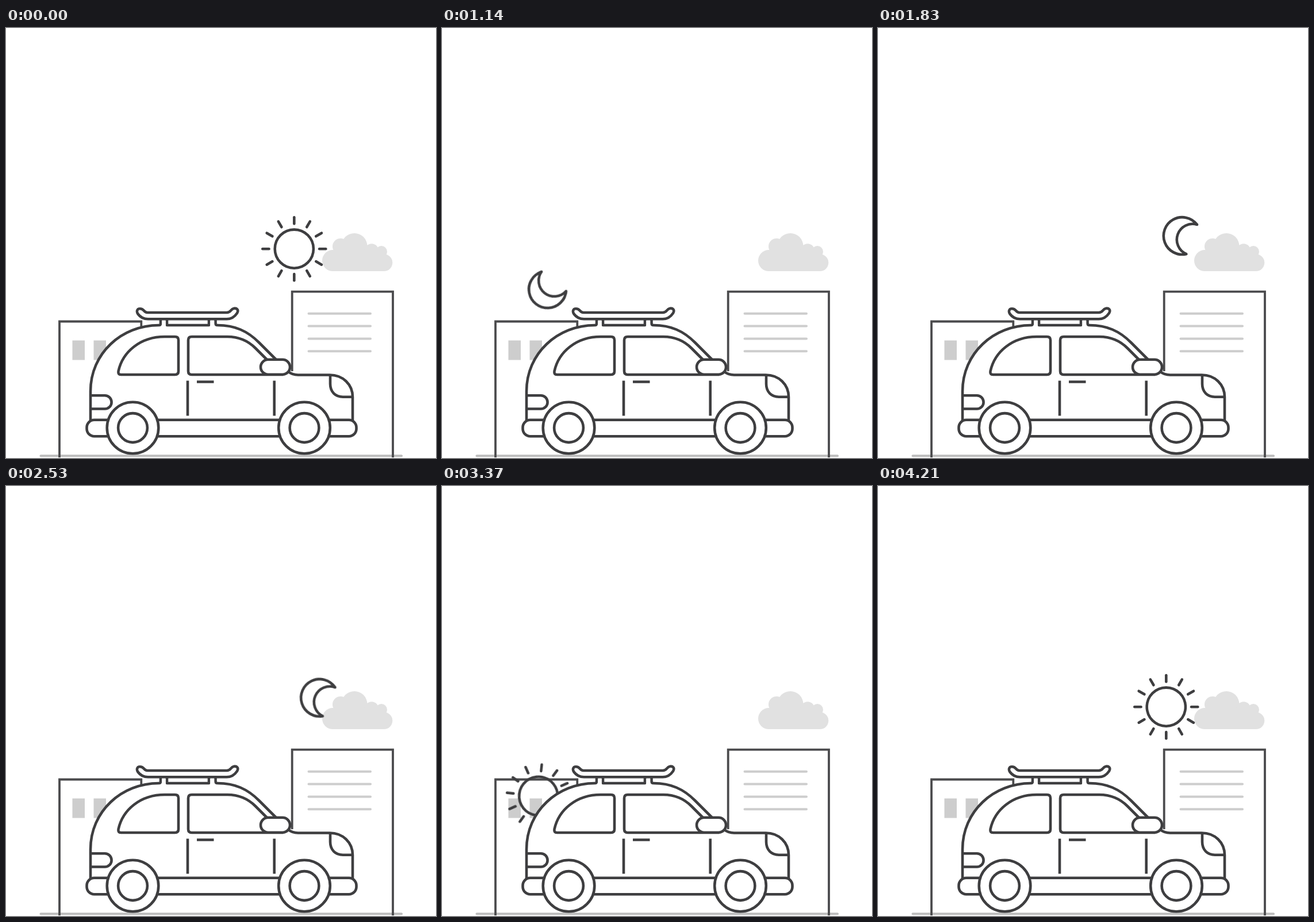
An HTML page that plays this animation: 748x748 px, repeating every 4.64 s.

```html
<!DOCTYPE html>
<html lang="en">
<head>
<meta charset="utf-8">
<title>Day and night drive</title>
<style>
  html, body { margin: 0; width: 100%; height: 100%; overflow: hidden; background: #fff; }
  svg { display: block; width: 100%; height: 100%; }

  .line { fill: none; stroke: #3e3e40; stroke-width: 4.6; stroke-linejoin: round; }
  .solid { fill: #fff; }
  .round { stroke-linecap: round; }
  .building { fill: none; stroke: #4b4b4d; stroke-width: 3.8; }
  .ground { stroke: #bcbcbc; stroke-width: 4; stroke-linecap: round; }
  .detail { fill: none; stroke: #cdcdcd; stroke-width: 4; stroke-linecap: round; }
  .pane { fill: #cdcdcd; }
  .cloud { fill: #e1e1e1; }

  /* Sun and moon circle the same point and move every 30 ms. */
  .sky { transform-origin: 420.7px 647px; animation: 4640ms -2ms infinite; }
  #sun { animation-name: sun-turn, sun-show; animation-timing-function: linear, step-end; }
  #moon { animation-name: moon-turn, moon-show; animation-timing-function: linear, step-end; }

  @keyframes sun-turn {
    0% { transform: rotate(0deg); }
    5.1724% { transform: rotate(0deg); animation-timing-function: steps(10); }
    11.6379% { transform: rotate(37.7deg); animation-timing-function: steps(14); }
    20.6897% { transform: rotate(81.4deg); animation-timing-function: step-end; }
    65.5172% { transform: rotate(-117deg); animation-timing-function: steps(39); }
    90.7328%, 100% { transform: rotate(0deg); }
  }
  @keyframes sun-show {
    0% { opacity: 1; }
    20.6897% { opacity: 0; }
    66.1638%, 100% { opacity: 1; }
  }
  @keyframes moon-turn {
    0% { transform: rotate(-109.2deg); }
    16.8103% { transform: rotate(-109.2deg); animation-timing-function: steps(35); }
    39.4397% { transform: rotate(0deg); }
    53.8793% { transform: rotate(0deg); animation-timing-function: steps(11); }
    60.9914% { transform: rotate(36.6deg); animation-timing-function: steps(9); }
    66.8103%, 100% { transform: rotate(64.1deg); }
  }
  @keyframes moon-show {
    0% { opacity: 0; }
    17.4569% { opacity: 1; }
    66.8103%, 100% { opacity: 0; }
  }
</style>
</head>
<body>
<svg viewBox="0 0 748 748">
  <defs>
    <path id="ray" d="M0-43.8V-55"/>
    <g id="rays">
      <use href="#ray"/>
      <use href="#ray" transform="rotate(30)"/>
      <use href="#ray" transform="rotate(60)"/>
    </g>
    <g id="wheel">
      <circle r="44.8"/>
      <circle r="25.4"/>
    </g>
  </defs>

  <g class="cloud">
    <circle cx="568.5" cy="404.6" r="18.5"/>
    <circle cx="582" cy="380" r="14"/>
    <circle cx="606" cy="379.5" r="22.5"/>
    <circle cx="636" cy="387.5" r="12.2"/>
    <circle cx="653" cy="389" r="10"/>
    <circle cx="657.5" cy="408.3" r="14.8"/>
    <path d="M568 390H656V423.1H568Z"/>
  </g>

  <path class="ground" d="M60.5 744.3H688"/>
  <path class="building" d="M93 747V510.5H235.3V530M497.7 597V458.7H673V747"/>
  <path class="pane" d="M115.5 543.5h21.5v34h-21.5zM152.5 543.5h21.5v34h-21.5z"/>
  <path class="detail" d="M526.5 496.7H634M526.5 518.6H634M526.5 540.4H634M526.5 562.3H634"/>

  <g id="sun" class="sky">
    <g class="line round" transform="translate(501.3 384.2)">
      <circle r="33.6"/>
      <use href="#rays"/>
      <use href="#rays" transform="rotate(90)"/>
      <use href="#rays" transform="rotate(180)"/>
      <use href="#rays" transform="rotate(270)"/>
    </g>
  </g>
  <g id="moon" class="sky">
    <path class="line" d="M555 342A32.4 32.4 0 1 0 536.3 393.2A27.3 27.3 0 0 1 555 342Z"/>
  </g>

  <g class="line">
    <path class="solid" d="M147 684V632C147 566 201 517 266 517Q269 517 269 514V507H280V517H353V507H364.5V514Q364.5 517 368 517C398 517 420 527 440 547L470 577L490 597C496 602 501 603.5 508 603.5H563C586 603.5 603 620 603 642V684Z"/>
    <path class="solid" stroke="none" d="M271.3 504H277.7V521H271.3ZM355.3 504H362.2V521H355.3Z"/>
    <path class="solid" d="M246 495C239 495 241 488.200 233 488.200C228 488.200 226.500 493 229.500 497.500C234 503.500 239 506.300 247 506.300H384C392 506.300 398 502 402 496C405.500 490 401 487 396.500 487.800C390 489 392 495 384 495Z"/>
    <path d="M195.500 597C203 563 234 537 276 537H294Q300 537 300 543V597Q300 603 294 603H200Q194.500 603 195.500 597Z"/>
    <path d="M455 578L434 557C420 543 405 537 385 537H323Q317 537 317 543V597Q317 603 323 603H482"/>
    <rect class="solid" x="443" y="576.800" width="51" height="26" rx="13"/>
    <path d="M316 613.500V674.500M466.700 613.500V674.500M332 615.500H361.500"/>
    <path d="M147 639.300H172A11.600 11.600 0 0 1 172 662.500H147M564 603.500V619C564 633 573 641.700 586 641.700H603"/>
    <rect class="solid" x="140.500" y="681.700" width="469" height="28.600" rx="13"/>
    <use class="solid" href="#wheel" x="220.500" y="695.500"/>
    <use class="solid" href="#wheel" x="519" y="695.500"/>
  </g>
</svg>
</body>
</html>
```
